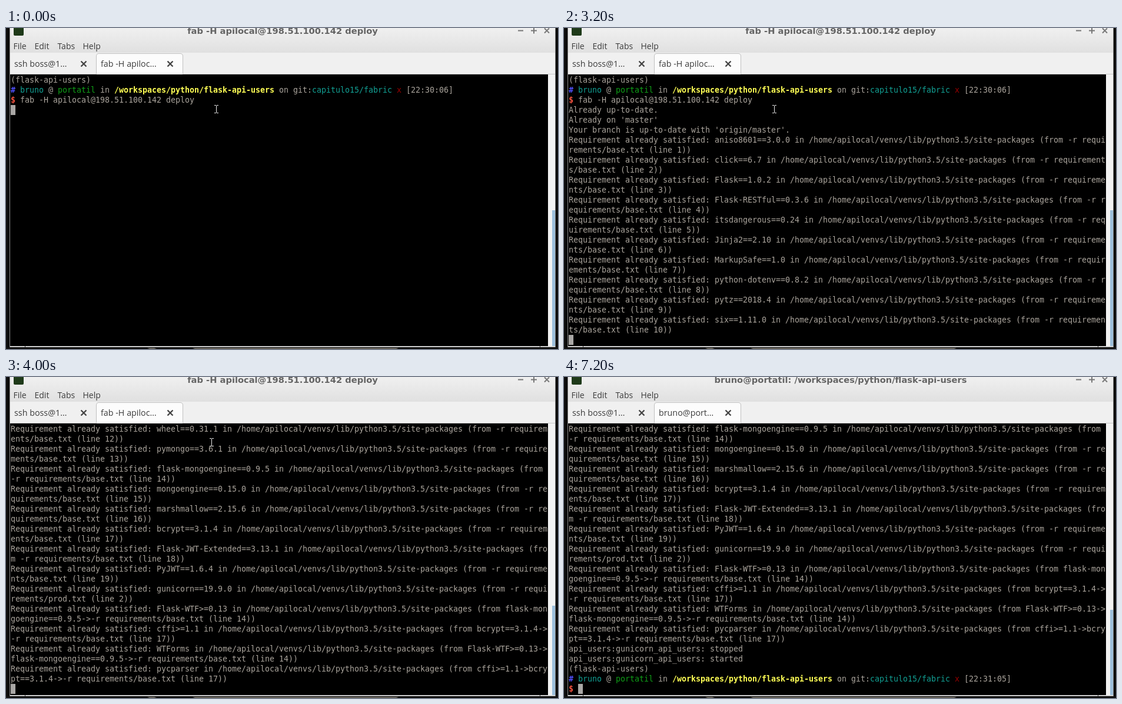
An HTML page that plays this animation: 938x546 px, repeating every 8 s.

```html
<!DOCTYPE html>
<html lang="en">
<head>
<meta charset="utf-8">
<title>Terminal deploy</title>
<style>
  html, body { margin: 0; width: 100%; height: 100%; overflow: hidden; background: #0c0c0c; }
  svg { position: absolute; left: 0; top: 0; }
  svg text { font: 14px "Open Sans", "Noto Sans", sans-serif; fill: #3c3c3c; }
  svg .title { font: bold 14.67px "DejaVu Sans", sans-serif; fill: #646464; text-anchor: middle; }
  svg .tab { font-size: 14.3px; }
  /* Terminal cells are exactly 8 by 17 pixels. */
  pre {
    position: absolute; left: 8px; top: 80px; margin: 0; color: #aaa49c;
    font: 13.333px/17px "DejaVu Sans Mono", monospace; letter-spacing: calc(8px - 1ch);
  }
  .blue { color: #5050ff; } .cyan { color: #12a094; } .green { color: #0f9f17; }
  .yellow { color: #ffff55; } .red { color: #960000; } .coral { color: #f75340; }
  .cursor { display: inline-block; width: 8px; height: 17px; vertical-align: top; background: #aaa8a6; }
</style>
</head>
<body>
<svg width="938" height="546" viewBox="0 0 938 546">
  <defs>
    <linearGradient id="bar" x2="0" y2="1"><stop stop-color="#f0f0f0"/><stop offset="1" stop-color="#e0e0e0"/></linearGradient>
  </defs>
  <rect x="6" width="928" height="543" fill="#8a8a8a"/>
  <rect x="7" width="926" height="42" fill="url(#bar)"/>
  <rect x="7" y="42" width="926" height="37" fill="#f0f0f0"/>
  <path d="M7 78.5H933" stroke="#c8c8c8"/>
  <rect x="13" y="-4" width="17" height="17" rx="2" fill="#1f3a1a"/>
  <text id="title" class="title" x="470" y="10"></text>
  <path d="M870 4.500h9M892 4.500h10M897 -.5v10M915 .5l8 8m0-8l-8 8" fill="none" stroke="#777" stroke-width="2"/>
  <text x="12.500" y="36">File</text>
  <text x="48.500" y="36">Edit</text>
  <text x="87.500" y="36">Tabs</text>
  <text x="130.500" y="36">Help</text>
  <path d="M153.500 79V48q0-4.500 4.500-4.500H296q4.500 0 4.500 4.500V79" fill="#fcfcfc" stroke="#c0c0c0"/>
  <text class="tab" x="14" y="66">ssh boss@1…</text>
  <text id="tab" class="tab" x="161" y="66"></text>
  <path d="M127.500 56.500l9 9m0-9l-9 9M274.500 56.500l9 9m0-9l-9 9" stroke="#444" stroke-width="2.400"/>
  <rect x="7" y="79" width="914" height="462" fill="#000"/>
  <rect x="921" y="79" width="12" height="462" fill="#f2f2f2"/>
  <rect id="thumb" x="928" width="5" fill="#9dbfdc"/>
  <rect x="7" y="541" width="926" height="1.500" fill="#e4e4e4"/>
  <path d="M32.500 541v2M907.500 541v2" stroke="#333"/>
  <rect y="543" width="938" height="3" fill="#101010"/>
  <path d="M240 544h12l4 2h-12zM317 544h350l-4 2h-342z" fill="#66625a"/>
</svg>
<pre id="screen"></pre>
<svg width="938" height="546" viewBox="0 0 938 546">
  <g id="pointer">
    <path id="beam" d="M-3 -6.500H0M1 -6.500H4M.5 -6V6M-3 6.500H0M1 6.500H4" fill="none" stroke="#eee"/>
    <path id="arrow" d="M0 0V15L3.500 12L6 18L8.500 17L6 11H11Z" fill="#fff" stroke="#222"/>
  </g>
</svg>
<script>
const $ = id => document.getElementById(id);
const LOOP = 8000, COLS = 114, ROWS = 27;
const user = 'bruno', host = 'portatil', remote = 'apilocal';
const command = `fab -H ${remote}@198.51.100.142 deploy`;
const project = '/workspaces/python/flask-api-users';

const span = (color, text) => `<span class="${color}">${text}</span>`;
const bold = (color, text) => `<b class="${color}">${text}</b>`;
const dollar = bold('coral', '$') + ' ';
const prompt = time => [
  '(flask-api-users)',
  `${bold('blue', '#')} ${span('cyan', user)} @ ${span('green', host)} in ${bold('yellow', project)}` +
  ` on git:${span('cyan', 'capitulo15/fabric')} ${span('red', 'x')} [${time}]`
];

// Long output breaks at the terminal's column limit.
const requirement = (name, from) =>
  `Requirement already satisfied: ${name} in /home/${remote}/venvs/lib/python3.5/site-packages (from ${from})`
    .match(new RegExp(`.{1,${COLS}}`, 'g'));
const base = line => `-r requirements/base.txt (line ${line})`;
const packages = `aniso8601==3.0.0 click==6.7 Flask==1.0.2 Flask-RESTful==0.3.6 itsdangerous==0.24
  Jinja2==2.10 MarkupSafe==1.0 python-dotenv==0.8.2 pytz==2018.4 six==1.11.0 Werkzeug==0.14.1
  wheel==0.31.1 pymongo==3.6.1 flask-mongoengine==0.9.5 mongoengine==0.15.0 marshmallow==2.15.6
  bcrypt==3.1.4 Flask-JWT-Extended==3.13.1 PyJWT==1.6.4`.split(/\s+/);
const mongo = 'flask-mongoengine==0.9.5->' + base(14);
const bcrypt = 'bcrypt==3.1.4->' + base(17);

const rows = [
  ...prompt('22:30:06'),
  dollar + command,
  'Already up-to-date.',
  "Already on 'master'",
  "Your branch is up-to-date with 'origin/master'.",
  ...packages.flatMap((name, i) => requirement(name, base(i + 1))),
  ...requirement('gunicorn==19.9.0', '-r requirements/prod.txt (line 2)'),
  ...requirement('Flask-WTF>=0.13', mongo),
  ...requirement('cffi>=1.1', bcrypt),
  ...requirement('WTForms', 'Flask-WTF>=0.13->' + mongo),
  ...requirement('pycparser', 'cffi>=1.1->' + bcrypt)
];
const installed = rows.length;
rows.push('api_users:gunicorn_api_users: stopped', 'api_users:gunicorn_api_users: started', ...prompt('22:31:05'));

// start time, rows printed, top of the scrollbar thumb
const stages = [
  [0, 3, 310], [500, 4, 310], [1200, 6, 310], [3200, 26, 310],
  [3400, installed, 389], [6200, installed + 2, 392], [7200, rows.length, 396]
];

let shown;
function showStage(stage) {
  if (stage === shown) return;
  shown = stage;
  const [, count, top] = stage, done = count === rows.length;
  const lines = [...rows.slice(0, count), (done ? dollar : '') + span('cursor', '')];
  $('screen').innerHTML = lines.slice(-ROWS).join('\n');
  $('title').textContent = done ? `${user}@${host}: ${project}` : command;
  $('tab').textContent = (done ? `${user}@${host}`.slice(0, 10) : command.slice(0, 13)) + '…';
  $('thumb').setAttribute('y', top);
  $('thumb').setAttribute('height', 541 - top);
}

// The pointer leaves upwards in six steps, turning into an arrow above the text.
function movePointer(t) {
  const u = Math.min(6, Math.max(0, Math.floor((t - 4000) / 100) + 1)) / 6;
  const x = Math.round(357 - 70 * u + 133 * u * u), y = Math.round(138 - 160 * u);
  $('pointer').setAttribute('transform', `translate(${x} ${y})`);
  $('beam').style.display = y < 79 ? 'none' : '';
  $('arrow').style.display = y < 79 ? '' : 'none';
}

function draw() {
  const t = performance.now() % LOOP;
  showStage(stages.findLast(([start]) => t >= start));
  movePointer(t);
  requestAnimationFrame(draw);
}
draw();
</script>
</body>
</html>
```
